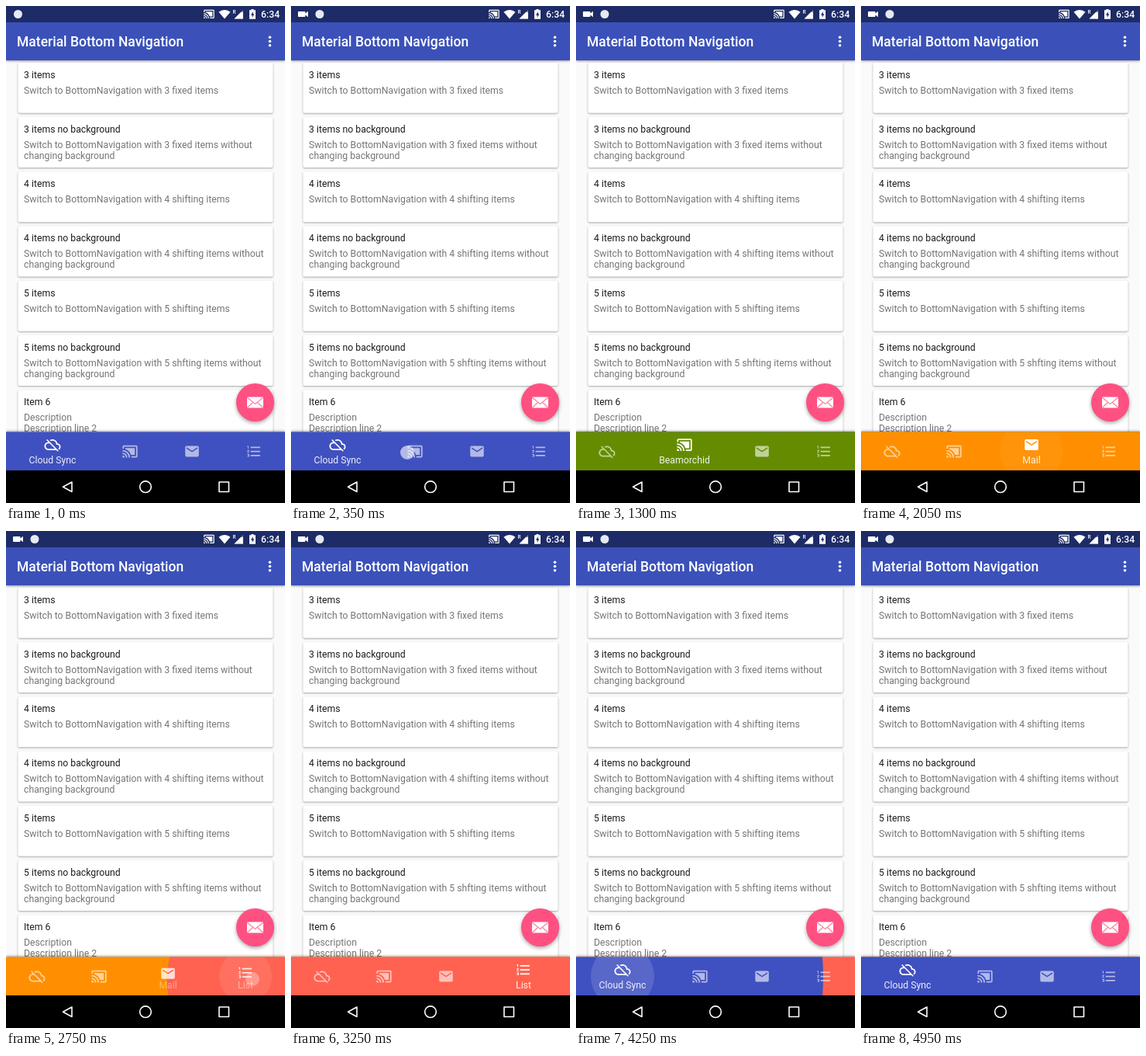
Write an HTML page that moves like this. It is 360 px wide and 640 px high and loops after 5 s.

```html
<!DOCTYPE html>
<html lang="en">
<head>
<meta charset="utf-8">
<title>Bottom navigation</title>
<style>
  html, body { margin: 0; height: 100%; overflow: hidden; background: #fafafa; }
  svg { display: block; width: 100vw; height: 100vh; font: 12.25px Roboto, sans-serif; }
  .card { fill: #fff; filter: drop-shadow(0 1px 1px rgba(0,0,0,.34)); }
  .head { fill: #1c1c1c; }
  .desc { fill: #757575; }
  .line { fill: none; stroke: #fff; }
</style>
</head>
<body>
<svg viewBox="0 0 360 640">
  <defs>
    <clipPath id="barClip"><rect y="548.5" width="360" height="49.5"/></clipPath>
    <g id="cloud"><path d="M19.35 10.04C18.67 6.59 15.64 4 12 4c-1.48 0-2.85.43-4.01 1.17l1.46 1.46C10.21 6.23 11.08 6 12 6c3.04 0 5.5 2.46 5.5 5.5v.5H19c1.66 0 3 1.34 3 3 0 1.13-.64 2.11-1.56 2.62l1.45 1.45C23.16 18.16 24 16.68 24 15c0-2.64-2.05-4.78-4.65-4.96zM3 5.27l2.75 2.74C2.56 8.15 0 10.77 0 14c0 3.31 2.69 6 6 6h11.73l2 2L21 20.73 4.27 4zM7.73 10l8 8H6c-2.21 0-4-1.79-4-4s1.79-4 4-4z"/></g>
    <g id="cast">
      <path d="M1 18v3h3a3 3 0 0 0-3-3zM19 7H5v1.63A13 13 0 0 1 13.37 17H19z"/>
      <path class="line" stroke-width="2" d="M2 8V5a1 1 0 0 1 1-1h18a1 1 0 0 1 1 1v14a1 1 0 0 1-1 1h-7M1 15a6 6 0 0 1 6 6M1 11a10 10 0 0 1 10 10"/>
    </g>
    <g id="mail"><path d="M20 4H4a2 2 0 0 0-2 2v12a2 2 0 0 0 2 2h16a2 2 0 0 0 2-2V6a2 2 0 0 0-2-2zm0 4l-8 5-8-5V6l8 5 8-5z"/></g>
    <g id="list"><path d="M2 17h2v.5H3v1h1v.5H2v1h3v-4H2zm1-9h1V4H2v1h1zm-1 3h1.8L2 13.1v.9h3v-1H3.2L5 10.9V10H2zm5-6v2h14V5zm0 14h14v-2H7zm0-6h14v-2H7z"/></g>
  </defs>

  <rect width="360" height="640" fill="#fafafa"/>
  <g id="cards"></g>

  <rect y="21" width="360" height="49" fill="#3b51b9" style="filter:drop-shadow(0 1px 1.5px rgba(0,0,0,.4))"/>
  <text x="14" y="52" font-size="17.5" font-weight="500" fill="#fff">Material Bottom Navigation</text>
  <g fill="#fff"><circle cx="340.5" cy="40.3" r="1.8"/><circle cx="340.5" cy="45.5" r="1.8"/><circle cx="340.5" cy="50.7" r="1.8"/></g>

  <rect width="360" height="21" fill="#1d2b66"/>
  <g fill="#fff">
    <path id="camera" d="M10 7h7.5a1 1 0 0 1 1 1v1.5l3.5-2.7v7.4l-3.5-2.7V13a1 1 0 0 1-1 1H10a1 1 0 0 1-1-1V8a1 1 0 0 1 1-1z"/>
    <circle id="badge" cy="10.5" r="5.5" fill="#e6e9f2"/>
    <use href="#cast" transform="translate(254.5 3) scale(.62)"/>
    <path d="M274.5 7.8a11.5 11.5 0 0 1 15 0L282 16.5z"/>
    <path d="M306 5v11.5h-11.5z" opacity=".45"/>
    <path d="M303.5 7.5v9h-9z"/><path d="M303 8h3v8.5h-3z"/>
    <text x="292.5" y="9.5" font-size="6.5" font-weight="500">R</text>
    <path d="M316.5 4h3v1.3h2.5v11.5h-8V5.300h2.500z"/>
    <path d="M318.700 7l-2.700 4.700h1.700v3.300l2.600-4.800h-1.600z" fill="#1d2b66"/>
    <text x="329" y="14.900" font-weight="500">6:34</text>
  </g>

  <g style="filter:drop-shadow(0 2px 2.5px rgba(0,0,0,.35))"><circle cx="321.5" cy="510.500" r="24.500" fill="#ff5082"/></g>
  <rect x="311" y="503.500" width="21" height="14" rx=".8" fill="#fff"/>
  <path d="M311 504l10.500 8.500 10.500-8.500M311 517.500l7.500-7M332 517.500l-7.500-7" fill="none" stroke="#ff7fa3" stroke-width="1.2"/>

  <rect id="bar" y="548.5" width="360" height="49.5" style="filter:drop-shadow(0 -1px 1.500px rgba(0,0,0,.4))"/>
  <g clip-path="url(#barClip)">
    <circle id="reveal"/>
    <circle id="ripple" cy="573.500" fill="#fff"/>
  </g>
  <g id="tabs" fill="#fff" text-anchor="middle"></g>

  <rect y="598" width="360" height="42"/>
  <path class="line" stroke-width="1.600" stroke-linejoin="round" d="M85 613v12.500L73.500 619.200zM275 613h12.500v12.500H275z"/>
  <circle class="line" stroke-width="1.600" cx="180" cy="619.200" r="7.300"/>
  <circle id="touch" r="9" fill="#fff"/>
</svg>
<script>
const LOOP = 5000, ITEM_MS = 300, REVEAL_MS = 400;
const $ = id => document.getElementById(id);
const set = (el, attrs) => { for (const k in attrs) el.setAttribute(k, attrs[k]); };
const clamp = v => Math.max(0, Math.min(1, v));
const ease = v => (1 - Math.cos(Math.PI * clamp(v))) / 2;

const tabs = [
  { icon: 'cloud', label: 'Cloud Sync', color: '#3f50c0' },
  { icon: 'cast', label: 'Beamorchid', color: '#658c00' },
  { icon: 'mail', label: 'Mail', color: '#ff8f00' },
  { icon: 'list', label: 'List', color: '#ff6250' }
];
const taps = [
  { at: 360, x: 150, y: 575, to: 1 },
  { at: 1640, x: 230, y: 575, to: 2 },
  { at: 2592, x: 318, y: 577, to: 3 },
  { at: 3950, x: 45, y: 574, to: 0 }
];

const intro = 'Switch to BottomNavigation with ';
const cards = [
  ['3 items', intro + '3 fixed items'],
  ['3 items no background', intro + '3 fixed items without', 'changing background'],
  ['4 items', intro + '4 shifting items'],
  ['4 items no background', intro + '4 shifting items without', 'changing background'],
  ['5 items', intro + '5 shifting items'],
  ['5 items no background', intro + '5 shfting items without', 'changing background'],
  ['Item 6', 'Description', 'Description line 2']
];
$('cards').innerHTML = cards.map(([head, ...lines], i) => {
  const y = 72.7 + i * 70.25;
  return `<rect class="card" x="15.5" y="${y}" width="329" height="65" rx="2"/>
    <text class="head" x="23" y="${y + 19.8}">${head}</text>` +
    lines.map((s, n) => `<text class="desc" x="23" y="${y + 39.8 + n * 14}">${s}</text>`).join('');
}).join('');

$('tabs').innerHTML = tabs.map(t => `<g><use href="#${t.icon}"/><text y="589">${t.label}</text></g>`).join('');
const tabNodes = [...$('tabs').children];

function draw(t) {
  // The tap whose press, transition or result is on screen
  const tap = taps.filter(p => t >= p.at - 100).pop() || { at: LOOP, x: 0, y: 0, to: 0 };
  const from = (tap.to + 3) % 4, age = t - tap.at;
  const shift = ease(age / ITEM_MS), spread = ease(age / REVEAL_MS);

  let left = 0;
  tabNodes.forEach((node, i) => {
    const active = i === tap.to ? shift : i === from ? 1 - shift : 0;
    const weight = tap.at === LOOP ? +(i === 0) : active;
    const width = 80 + 40 * weight, x = left + width / 2;
    left += width;
    const [icon, label] = node.children;
    set(icon, {
      transform: `translate(${x - 10.5} ${563 - 8.5 * weight}) scale(.876)`,
      opacity: .6 + .4 * weight
    });
    set(label, { x, opacity: .9 * weight });
    if (i === tap.to) set($('ripple'), { cx: x });
  });

  const idle = tap.at === LOOP;
  set($('bar'), { fill: tabs[idle ? 0 : from].color });
  set($('reveal'), {
    cx: tap.x, cy: tap.y, fill: tabs[tap.to].color,
    r: spread === 1 ? 400 : spread * (Math.max(tap.x, 360 - tap.x) + 5)
  });
  set($('ripple'), {
    r: 10 + 31 * ease((age + 60) / 320),
    opacity: idle ? 0 : .13 * clamp((age + 60) / 310) * clamp((440 - age) / 100)
  });
  set($('touch'), { cx: tap.x, cy: tap.y, opacity: idle ? 0 : .6 * clamp((220 - age) / 120) });

  const recording = t >= 200;
  set($('camera'), { opacity: +recording });
  set($('badge'), { cx: recording ? 37 : 15.5 });
}

const begin = performance.now();
(function tick() {
  draw((performance.now() - begin) % LOOP);
  requestAnimationFrame(tick);
})();
</script>
</body>
</html>
```
